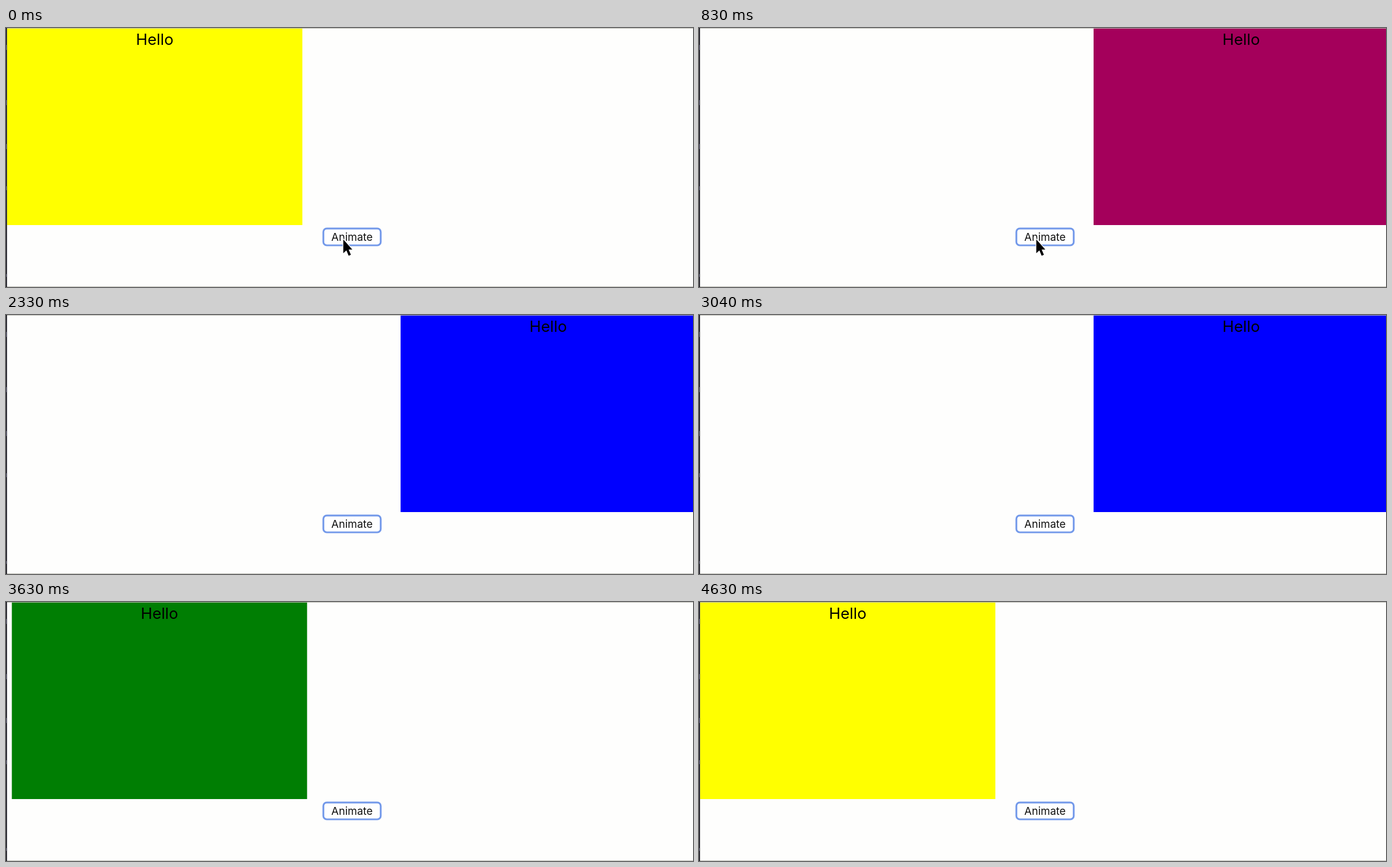
Recreate the animation shown at these times as an HTML page. Size 1217 by 460 pixels, loop 4.68 s.

```html
<!DOCTYPE html>
<html lang="en">
<head>
<meta charset="utf-8">
<title>Hello</title>
<style>
  html, body { margin: 0; height: 100%; overflow: hidden; background: #fefefd; }
  svg { display: block; font-family: Inter, sans-serif; text-anchor: middle; }
</style>
</head>
<body>
<svg width="1217" height="460" viewBox="0 0 1217 460">
  <rect width="1217" height="460" fill="#fefefd"/>
  <g id="box">
    <rect y="1" width="523" height="349"/>
    <text x="261.5" y="29.7" font-size="27.5" fill="#000">Hello</text>
  </g>
  <path d="M0 .5H1217M0 459.5H1217" stroke="#b9b9b0"/>
  <rect width="1.7" height="460" fill="#100f18"/>
  <path d="M.5 30v9M.5 128v9M.5 206v9M.5 281v7M.5 437v5" stroke="#5d5b78"/>
  <rect x="562.2" y="356.2" width="101.6" height="29.8" rx="6" fill="#fff" stroke="#749aea" stroke-width="3.2"/>
  <text x="613" y="378.3" font-size="19" fill="#111">Animate</text>
  <path id="cursor" d="M597.5 375.5V400L603 395L607 404.5L611 402.8L607 393.5H613.5Z"
    fill="#000" stroke="#fff" stroke-width="2.4" paint-order="stroke"/>
</svg>
<script>
const LOOP = 4680, STEP = 510, RIGHT = 699, LEFT = 2;
const YELLOW = [255, 255, 0], RED = [255, 0, 0], BLUE = [0, 0, 255], GREEN = [0, 128, 0];
const CURSOR_HIDDEN = 1650;

// Each move: start time, target position, target colour
const moves = [
  [205, RIGHT, RED],
  [205 + STEP, RIGHT, BLUE],
  [3194, LEFT, GREEN],
  [3194 + STEP, LEFT, YELLOW],
];

const box = document.getElementById('box');
const panel = box.querySelector('rect');
const cursor = document.getElementById('cursor');
const mix = (a, b, k) => a + (b - a) * k;

// CSS "ease": cubic-bezier(.25, .1, .25, 1)
function ease(t) {
  if (t <= 0 || t >= 1) return t <= 0 ? 0 : 1;
  let lo = 0, hi = 1;
  for (let i = 0; i < 24; i++) {
    const s = (lo + hi) / 2;
    if (0.75 * s * (1 - s) + s ** 3 < t) lo = s; else hi = s;
  }
  return 0.3 * lo * (1 - lo) ** 2 + 3 * lo * lo * (1 - lo) + lo ** 3;
}

function draw(now) {
  const time = now % LOOP;
  let x = LEFT, color = YELLOW;
  for (const [start, nextX, nextColor] of moves) {
    const k = ease((time - start) / STEP);
    x = mix(x, nextX, k);
    color = color.map((c, i) => mix(c, nextColor[i], k));
  }
  box.setAttribute('transform', `translate(${x} 0)`);
  panel.setAttribute('fill', `rgb(${color.map(Math.round)})`);
  cursor.style.display = time < CURSOR_HIDDEN ? '' : 'none';
}

const begin = performance.now();
function tick() {
  draw(performance.now() - begin);
  requestAnimationFrame(tick);
}
tick();
</script>
</body>
</html>
```
